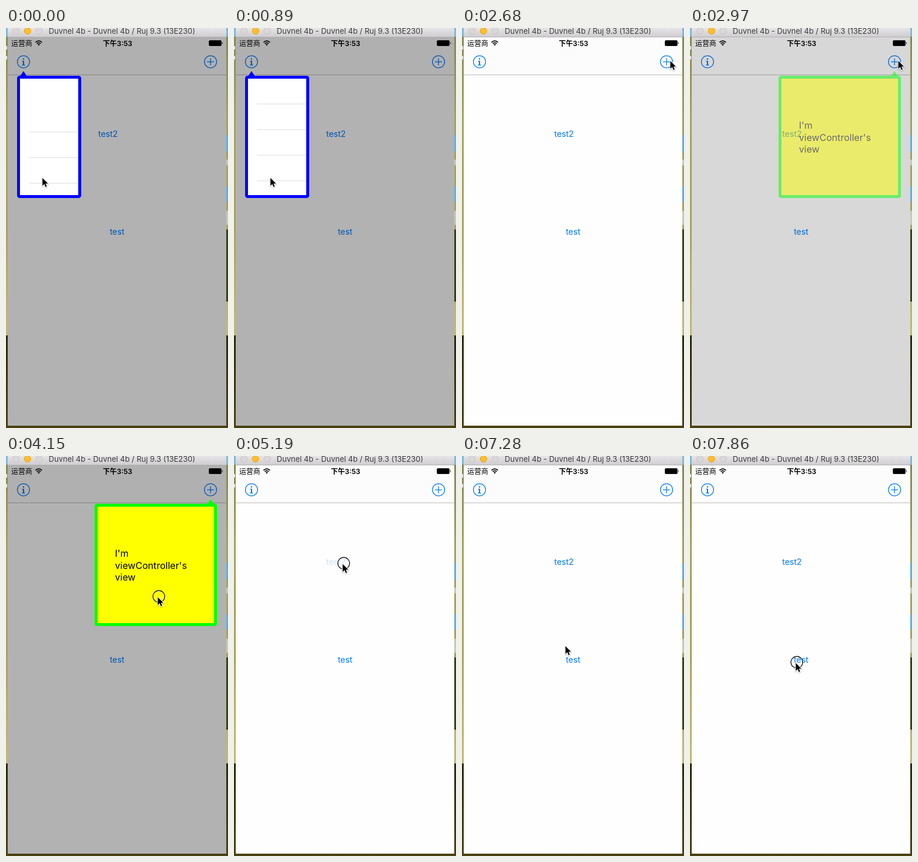
Animation, 381 px wide and 687 px high, one loop 8000 ms. Source, as an HTML page:

```html
<!DOCTYPE html>
<html lang="zh">
<head>
<meta charset="utf-8">
<title>Popover demo</title>
<style>
  html, body { margin: 0; width: 100%; height: 100%; overflow: hidden; background: #fff; }
  svg { display: block; width: 381px; height: 687px; }
  text { font-family: Inter, "Noto Sans CJK SC", "Noto Sans CJK", sans-serif; white-space: pre; }
  .tint { fill: none; stroke: #007aff; stroke-width: 1.25; }
  .link { fill: #007aff; font-size: 14.4px; letter-spacing: -.1px; text-anchor: middle; }
</style>
</head>
<body>
<svg viewBox="0 0 381 687" xmlns="http://www.w3.org/2000/svg">
  <defs>
    <linearGradient id="bar" x1="0" y1="0" x2="0" y2="1">
      <stop offset="0" stop-color="#e6e4e6"/>
      <stop offset="1" stop-color="#d0ced0"/>
    </linearGradient>
    <linearGradient id="grass" x1="0" y1="0" x2="0" y2="1">
      <stop offset="0" stop-color="#858650"/>
      <stop offset=".3" stop-color="#a5a45c"/>
      <stop offset=".65" stop-color="#a9a35a"/>
      <stop offset="1" stop-color="#c3bc70"/>
    </linearGradient>
    <linearGradient id="soil" x1="0" y1="0" x2="0" y2="1">
      <stop offset="0" stop-color="#2c2a08"/>
      <stop offset="1" stop-color="#4a4212"/>
    </linearGradient>
    <clipPath id="table"><rect x="24" y="87" width="100" height="200"/></clipPath>
  </defs>

  <!-- desktop -->
  <rect width="381" height="528" fill="url(#grass)"/>
  <rect y="528" width="381" height="159" fill="url(#soil)"/>
  <rect width="381" height="15" fill="#7fb9dc"/>
  <path d="M0 31h2v6H0zM0 48h2v6H0z" fill="#e8e8e0"/>
  <path d="M378 184h3v28h-3zM378 272h3v26h-3z" fill="#58b4e6"/>
  <path d="M378 226h3v10h-3zM378 314h3v24h-3z" fill="#c9c9b4"/>
  <rect x="378" y="346" width="3" height="124" fill="#3b4212"/>

  <!-- window -->
  <rect x="3" width="375" height="15" fill="url(#bar)"/>
  <rect x="3" y="15" width="375" height="1" fill="#b4b2b4"/>
  <g stroke-width="1">
    <circle cx="17" cy="5" r="5.7" fill="#d9d7d9" stroke="#c5c3c5"/>
    <circle cx="37" cy="5" r="5.7" fill="#fdbe2e" stroke="#e3a52a"/>
    <circle cx="57" cy="5" r="5.7" fill="#d9d7d9" stroke="#c5c3c5"/>
  </g>
  <text x="199" y="10" font-size="13" fill="#3c3c3c" text-anchor="middle">Duvnel 4b - Duvnel 4b / Ruj 9.3 (13E230)</text>

  <!-- app screen -->
  <rect x="3" y="16" width="375" height="667" fill="#fefefe"/>
  <rect x="3" y="16" width="375" height="64" fill="#fcfcfc"/>
  <rect x="3" y="80" width="375" height="1" fill="#bcbcbc"/>
  <text x="9" y="31" font-size="12">运营商</text>
  <g fill="none" stroke="#000" stroke-width="1.7">
    <path d="M50.6 24.6Q56.2 19.6 61.8 24.6M52.8 26.9Q56.2 23.9 59.6 26.9"/>
    <path d="M54.2 28.2Q56.2 26.6 58.2 28.2L56.2 30.4Z" fill="#000" stroke="none"/>
  </g>
  <text x="191.5" y="31" font-size="12" font-weight="600" text-anchor="middle">下午3:53</text>
  <rect x="348.5" y="21.5" width="21" height="9" rx="1.5" fill="#000" stroke="#000" stroke-opacity=".8"/>
  <path d="M371 24q2 2 0 4z"/>
  <circle class="tint" cx="30" cy="58" r="10.5"/>
  <path d="M28.9 52h2.2v2.2h-2.2zM27.5 56.2h3.6v6.8h1.6v1.2h-5.4v-1.2h1.6v-5.6h-1.4z" fill="#007aff"/>
  <g id="plus" class="tint">
    <circle cx="351" cy="58" r="10.5"/>
    <path d="M345 58h12M351 52v12"/>
  </g>
  <text id="test2" class="link" x="175" y="187">test2</text>
  <text class="link" x="190.6" y="355">test</text>

  <rect id="dim" x="3" y="16" width="375" height="667"/>

  <!-- popovers -->
  <g id="blue">
    <path d="M24 83L30 74L36 83z" fill="#00f"/>
    <rect x="19" y="82" width="110" height="210" rx="4.5" fill="#00f"/>
    <rect x="24" y="87" width="100" height="200" fill="#fff"/>
    <g clip-path="url(#table)"><path id="rows" fill="#dedee0"/></g>
  </g>
  <g id="yellow">
    <path d="M345 83L351 74L357 83z" fill="#0f0"/>
    <rect x="152" y="82" width="210" height="210" rx="4.5" fill="#0f0"/>
    <rect x="157" y="87" width="200" height="200" fill="#ff0"/>
    <g font-size="16.1">
      <text x="187" y="173">I'm</text>
      <text x="187" y="193.5">viewController's</text>
      <text x="187" y="213.5">view</text>
    </g>
  </g>
  <g id="green" fill="#0f0">
    <path d="M169 210L175 201L181 210z"/>
    <rect x="123" y="209" width="70" height="50" rx="4.5"/>
  </g>

  <g id="pointer">
    <g id="ring" fill="none">
      <circle cx="2.3" cy="-.7" r="9.2" stroke="#fff" stroke-opacity=".75"/>
      <circle cx="2.3" cy="-.7" r="10.1" stroke="#000" stroke-width="1.2"/>
    </g>
    <path id="arrow" d="M.5 .5V14L3.7 11L5.9 16L8 15.1L5.9 10.2H10.2Z" stroke-linejoin="round"/>
  </g>
</svg>
<script>
  const LOOP = 8000, STEP = 148.2;
  const $ = id => document.getElementById(id);

  // keys are [tick, value, ...]
  const path = [
    [0, 62, 257], [7, 62, 257], [13, 222, 135], [14, 222, 135],
    [18, 357, 56], [22, 357, 56], [27, 260, 242], [28, 260, 242],
    [30, 130, 225], [31, 130, 225], [35, 186, 185], [36, 186, 185],
    [38, 158, 226], [40, 154, 234], [41, 154, 234], [43, 171, 283],
    [46, 171, 283], [51, 181, 355]
  ];
  const fades = {
    blue: [[14, 1], [16, 0]],
    yellow: [[19, 0], [21, 1], [30, 1], [32, 0]],
    green: [[35, 0], [37, 1], [45, 1], [47, 0]]
  };
  const presses = [14, 19, 28, 30, 35, 41, 45, 53];

  function at(keys, k, col = 1) {
    const i = keys.findIndex(key => key[0] > k);
    if (i === 0) return keys[0][col];
    if (i < 0) return keys[keys.length - 1][col];
    const a = keys[i - 1], b = keys[i];
    return a[col] + (b[col] - a[col]) * (k - a[0]) / (b[0] - a[0]);
  }

  // soft shadow and white rim under the arrow
  const arrow = $("arrow");
  for (const [color, width, opacity, dy] of [["#000", 3.4, .16, 1], ["#fff", 2, 1, 0]]) {
    const rim = arrow.cloneNode();
    rim.removeAttribute("id");
    rim.setAttribute("fill", color);
    rim.setAttribute("stroke", color);
    rim.setAttribute("stroke-width", width);
    rim.setAttribute("opacity", opacity);
    rim.setAttribute("transform", `translate(0 ${dy})`);
    arrow.before(rim);
  }

  function draw(t) {
    const k = Math.min(53, Math.floor((t + 5) / STEP));

    let shade = 0;
    for (const id in fades) {
      const alpha = at(fades[id], k);
      $(id).setAttribute("opacity", alpha);
      shade = Math.max(shade, alpha);
    }
    $("dim").setAttribute("opacity", .3 * shade);

    // table springs back after being pulled down
    const pull = Math.round(48 * Math.exp(-.826 * k));
    const lines = [0, 1, 2, 3].map(i => `M39 ${130 + 44 * i + pull}h85v1h-85z`);
    $("rows").setAttribute("d", lines.join(""));

    $("plus").setAttribute("opacity", k === 19 ? .2 : 1);
    $("test2").setAttribute("opacity", k === 35 ? .2 : 1);

    const x = Math.round(at(path, k, 1)), y = Math.round(at(path, k, 2));
    $("pointer").setAttribute("transform", `translate(${x} ${y})`);
    $("ring").setAttribute("opacity", presses.includes(k) ? 1 : 0);
  }

  let start;
  function loop(now) {
    start ??= now;
    draw((now - start) % LOOP);
    requestAnimationFrame(loop);
  }
  draw(0);
  requestAnimationFrame(loop);
</script>
</body>
</html>
```
